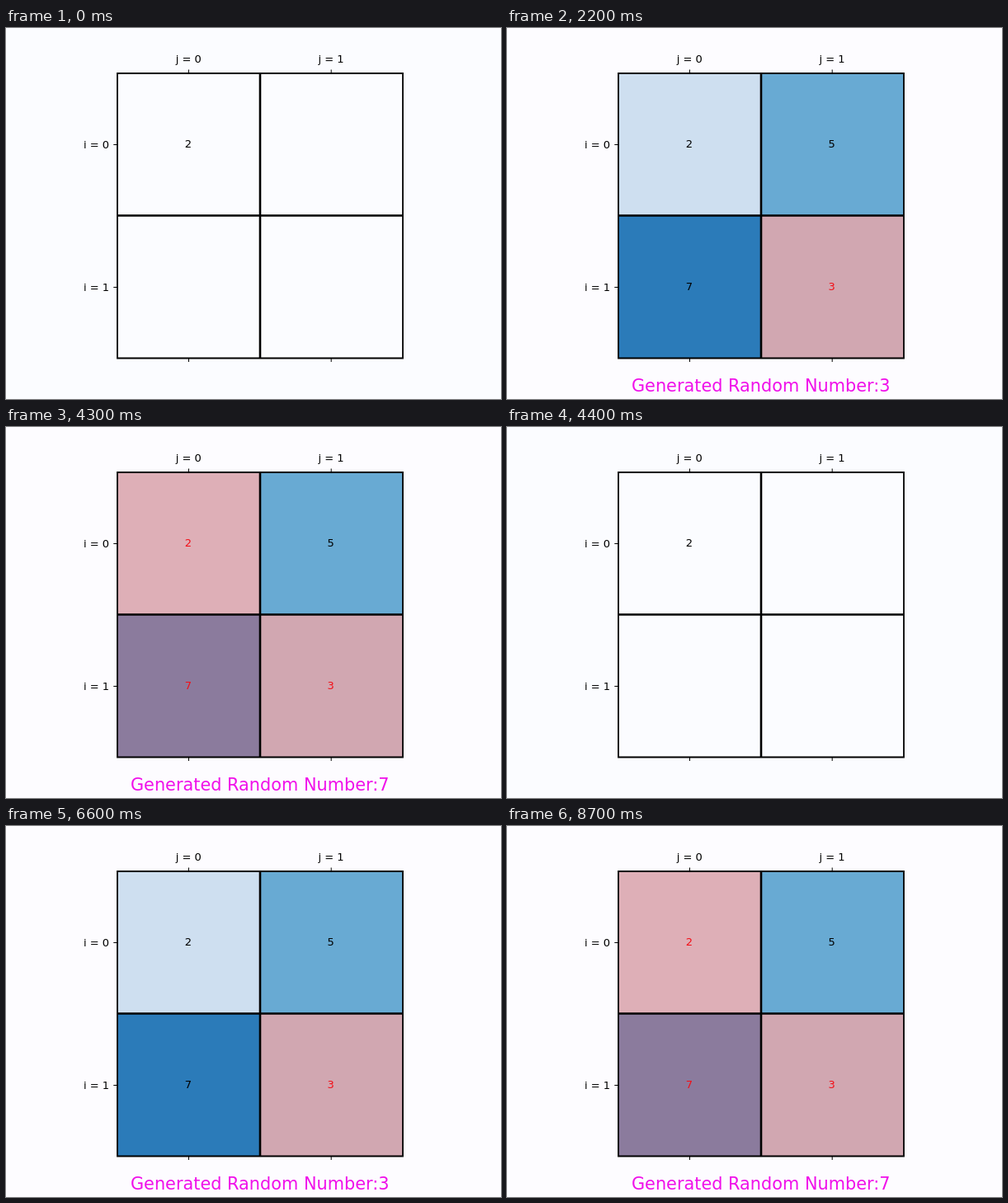
Write an HTML page that moves like this. It is 600x450 px and loops after 8.8 s.

```html
<!DOCTYPE html>
<html lang="en">
<head>
<meta charset="utf-8">
<title>Random number grid</title>
<style>
html, body { margin: 0; width: 100%; height: 100%; overflow: hidden; background: #fbfcff; }
svg { display: block; width: 600px; height: 450px; }
text { font: 13.02px "DejaVu Sans", sans-serif; text-anchor: middle; }
</style>
</head>
<body>
<svg id="stage" viewBox="0 0 600 450"></svg>
<script>
const NS = "http://www.w3.org/2000/svg";
const stage = document.getElementById("stage");
const CYCLE = 4400;   // the 8800 ms loop holds two equal cycles
const FILL_AT = 2200; // heat map and first draw
const LEFT = 135, TOP = 55, RIGHT = 481, BOTTOM = 400.5;
const COLS = [221.5, 394.2], ROWS = [141.5, 314.5];
const MID_X = 308, MID_Y = 227.5;

const cells = [
  { col: 0, row: 0, value: 2, shown: 0, hit: 3300, cool: "#cedff0", warm: "#deafb7" },
  { col: 1, row: 0, value: 5, shown: 500, hit: Infinity, cool: "#68aad3", warm: "#68aad3" },
  { col: 0, row: 1, value: 7, shown: 1100, hit: 3800, cool: "#2b7bb9", warm: "#8b7b9d" },
  { col: 1, row: 1, value: 3, shown: 1600, hit: 2200, cool: "#d1a7b1", warm: "#d1a7b1" }
];
const draws = cells.filter(c => c.hit < CYCLE).sort((a, b) => a.hit - b.hit);

function add(tag, attrs, label) {
  const el = document.createElementNS(NS, tag);
  for (const key in attrs) el.setAttribute(key, attrs[key]);
  if (label !== undefined) el.textContent = label;
  return stage.appendChild(el);
}

function line(d, width) {
  add("path", { d, fill: "none", stroke: "#000", "stroke-width": width });
}

const paper = add("rect", { width: 600, height: 450 });

for (const c of cells) {
  c.box = add("rect", {
    x: c.col ? MID_X : LEFT,
    y: c.row ? MID_Y : TOP,
    width: c.col ? RIGHT - MID_X : MID_X - LEFT,
    height: c.row ? BOTTOM - MID_Y : MID_Y - TOP
  });
}

line(`M${MID_X} ${TOP}V${BOTTOM}M${LEFT} ${MID_Y}H${RIGHT}`, 2.6);
line(`M${LEFT} ${TOP}H${RIGHT}V${BOTTOM}H${LEFT}Z`, 1.8);

COLS.forEach((x, j) => {
  line(`M${x} 50.5V${TOP}M${x} ${BOTTOM}V405`, 1);
  add("text", { x: x - 0.2, y: 42 }, `j = ${j}`);
});
ROWS.forEach((y, i) => {
  line(`M130.3 ${y}H${LEFT}`, 1);
  add("text", { x: 125, y: y + 4.8, style: "text-anchor:end" }, `i = ${i}`);
});

for (const c of cells) {
  c.label = add("text", { x: COLS[c.col] - 0.6, y: c.row ? 318 : 144.8 }, c.value);
}
const caption = add("text", { x: 307.7, y: 441, fill: "#f010ea", style: "font-size:20.83px" });

function render(now) {
  const t = now % CYCLE;
  const filled = t >= FILL_AT;
  paper.setAttribute("fill", filled ? "#fdfcff" : "#fbfcff");
  for (const c of cells) {
    const hit = t >= c.hit;
    c.box.setAttribute("fill", filled ? (hit ? c.warm : c.cool) : "none");
    c.label.setAttribute("fill", hit ? "#f21018" : "#000");
    c.label.setAttribute("visibility", t >= c.shown ? "visible" : "hidden");
  }
  const last = draws.filter(c => t >= c.hit).pop();
  caption.textContent = last ? `Generated Random Number:${last.value}` : "";
}

const start = performance.now();
function tick() {
  render(performance.now() - start);
  requestAnimationFrame(tick);
}
render(0);
requestAnimationFrame(tick);
</script>
</body>
</html>
```
